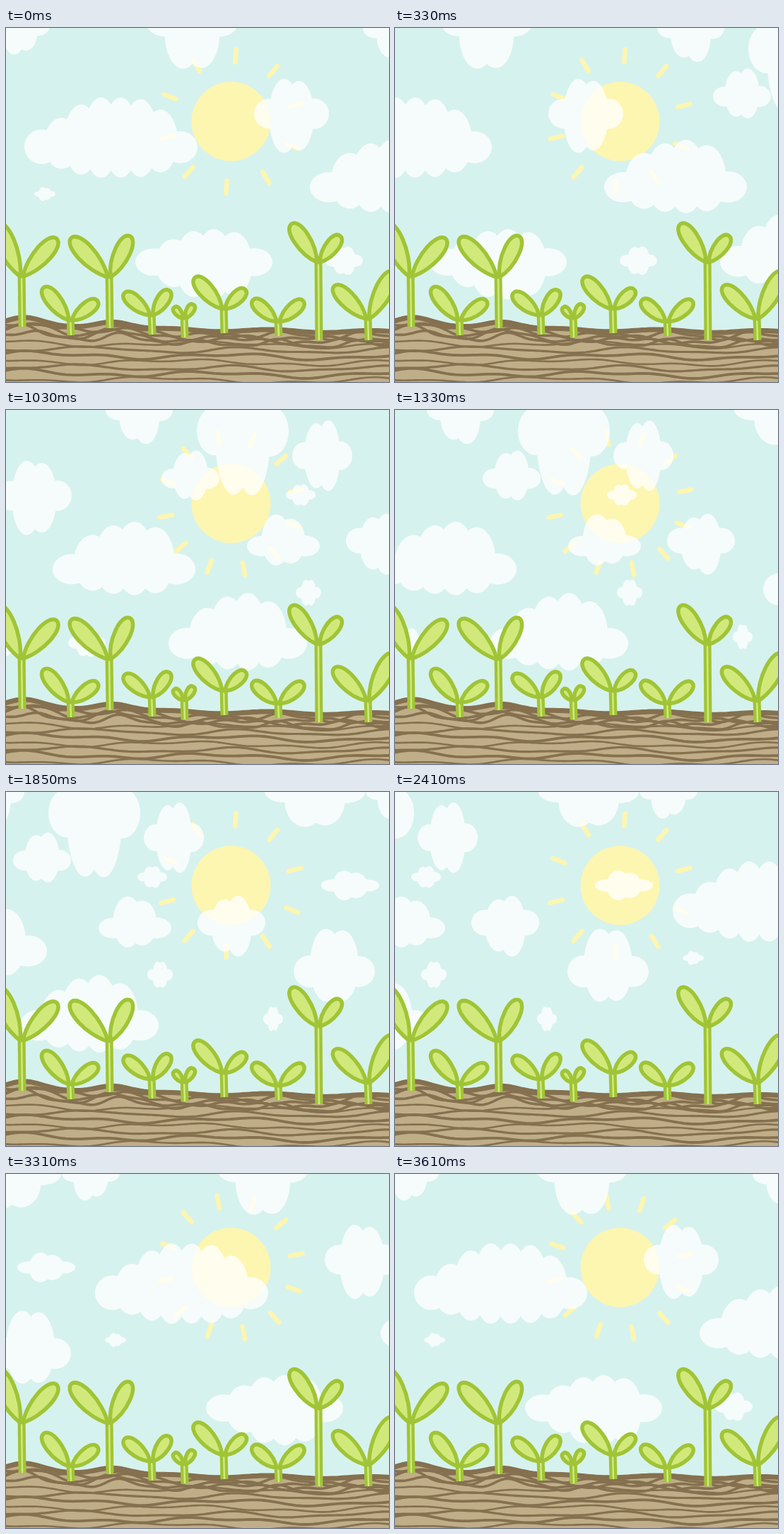
Recreate the animation shown at these times as an HTML page. Size 542 by 500 pixels, loop 3.71 s.

```html
<!DOCTYPE html>
<html lang="en">
<head>
<meta charset="utf-8">
<title>Seedlings under a drifting sky</title>
<style>
html, body { margin: 0; width: 100%; height: 100%; overflow: hidden; background: #d6f2ee; }
svg { display: block; width: 100%; height: 100%; }
</style>
</head>
<body>
<svg viewBox="0 0 542 500">
  <rect width="542" height="500" fill="#d6f2ee"/>
  <g id="sun" fill="#fdf6b1" stroke="#fdf6b1" stroke-width="6.5" stroke-linecap="round"></g>
  <g fill="#fff" opacity=".79">
    <g id="sky"><g id="clouds"></g><use href="#clouds" x="1104"/><use href="#clouds" x="-1104"/></g>
  </g>
  <g id="soil" fill="none" stroke="#85704f" stroke-linecap="round" stroke-linejoin="round"></g>
  <g id="plants" fill="#d1e97b" stroke="#a0c436" stroke-linejoin="round"></g>
</svg>
<script>
const LOOP = 3710, WORLD = 1104;
const $ = id => document.getElementById(id);

let seed = 7;
const random = () => (seed = seed * 16807 % 2147483647) / 2147483647;
const bell = (x, mid, width) => Math.exp(-(((x - mid) / width) ** 2));

// A row of puffs fills the box; tallest at peak, low = how far the small ones sink.
function cloud(x, y, w, h, peak = .5, low = .5) {
  const n = Math.max(4, Math.round(w / 32)), rx = .8 * w / n;
  let puffs = '';
  for (let i = 0; i < n; i++) {
    const u = i / (n - 1), far = (u - peak) / (u < peak ? peak : 1 - peak);
    const tall = (1 - .6 * far * far) * (1 - .1 * random());
    const cx = x + rx + (w - 2 * rx) * u, cy = y + h * (low * (1 - tall) + tall / 2);
    puffs += `<ellipse cx="${cx}" cy="${cy}" rx="${rx}" ry="${h * tall / 2}"/>`;
  }
  return puffs;
}
$('clouds').innerHTML = [
  cloud(26, 92, 245, 122, .6, .7),
  cloud(40, 224, 30, 21, .35),
  cloud(199, -40, 129, 105, .5, .2),
  cloud(351, 68, 106, 113, .5, .45),
  cloud(183, 281, 194, 106, .7, .45),
  cloud(430, 150, 202, 114, .6, .75),
  cloud(505, -30, 95, 80, .6, .3),
  cloud(452, 306, 53, 45, .6),
  cloud(584, 54, 82, 76, .5, .6),
  cloud(634, -50, 130, 182, .5, .4),
  cloud(769, 12, 85, 105, .6),
  cloud(760, 103, 42, 34),
  cloud(594, 255, 196, 114, .6, .75),
  cloud(705, 144, 103, 77, .45, .7),
  cloud(774, 237, 36, 42),
  cloud(845, 143, 96, 95, .7, .4),
  cloud(940, -25, 142, 80, .5, .2),
  cloud(938, 301, 28, 39),
  cloud(981, 186, 115, 114, .4, .65),
  cloud(1020, 110, 82, 44, .45),
  cloud(1083, -25, 82, 64, .4, .3)
].join('');

// Three redrawn suns: evenly spread rays, each set with its own count and turn.
function sun(count, turn, radius) {
  let rays = '';
  for (let i = 0; i < count; i++) {
    const a = (turn + i * 360 / count) * Math.PI / 180;
    const at = r => `${318.5 + r * Math.cos(a)},${132 + r * Math.sin(a)}`;
    rays += `M${at(radius - 9)}L${at(radius + 9)}`;
  }
  return `<g><circle cx="318.5" cy="132" r="56" stroke="none"/><path d="${rays}"/></g>`;
}
$('sun').innerHTML = sun(10, -86, 93) + sun(12, -131, 94) + sun(11, -78, 96);

// Soil: a bumpy edge with strands of brown line below it.
const ground = x => 424 + (x - 300) * .01 - 17 * bell(x, 24, 40) - 12 * bell(x, 152, 36) + 1.8 * Math.sin(x / 23 + 1);
const wave = (x, k) => Math.sin(x / (17 + k % 3 * 4) + k * 2.3) + .5 * Math.sin(x / 9 + k * 4.1);
function strand(f, width, extra = '') {
  let d = '';
  for (let x = 0; x <= 545; x += 5) d += `${x ? 'L' : 'M'}${x},${f(x).toFixed(1)}`;
  return `<path d="${d}${extra}" stroke-width="${width}"/>`;
}
let soil = `<g fill="#bfae88">${strand(ground, 0, 'V500H0Z')}</g>` + strand(x => ground(x) + 3, 7);
for (let k = 0; k < 4; k++) soil += strand(x => ground(x) + 9 + k * 4 + 3.5 * wave(x, k), 3.6);
for (let k = 0; k < 7; k++) {
  soil += strand(x => 447 + k * 8.5 + 3.4 * wave(x * .5, k + 5) + (ground(x) - 424) * .2, 2.6 + k % 3 * .6);
}
$('soil').innerHTML = soil;

// A leaf runs from base to tip, wider when longer.
function leaf(bx, by, tx, ty) {
  const dx = tx - bx, dy = ty - by, len = Math.hypot(dx, dy);
  const half = Math.min(.3 * len, 6 + .13 * len), end = 1 - 2 / len;
  const at = (u, w) => `${bx + dx * u - dy / len * w},${by + dy * u + dx / len * w}`;
  return `<path d="M${bx},${by}C${at(.35, half)} ${at(.96, half)} ${at(end, 0)}C${at(.96, -half)} ${at(.35, -half)} ${bx},${by}Z" stroke-width="5.5"/>`;
}
// Stem from joint to foot, then a leaf to each tip.
function sprout(x, joint, foot, lx, ly, rx, ry) {
  const d = `M${x},${joint - 6}L${x + 1},${foot}`;
  return `<path d="${d}" stroke-width="11"/><path d="${d}" stroke="#d1e97b" stroke-width="2.5"/>` +
    leaf(x - 2, joint, lx, ly) + leaf(x + 2, joint, rx, ry);
}
$('plants').innerHTML = [
  sprout(22, 351, 422, -14, 273, 73, 296),
  sprout(91, 413, 434, 52, 365, 131, 384),
  sprout(146, 352, 424, 91, 295, 176, 292),
  sprout(206, 406, 433, 166, 373, 232, 369),
  sprout(252, 410, 437, 237, 393, 266, 389),
  sprout(308, 397, 431, 266, 351, 340, 368),
  sprout(385, 415, 435, 348, 383, 422, 384),
  sprout(442, 331, 441, 403, 275, 474, 292),
  sprout(512, 411, 441, 463, 363, 549, 342)
].join('');

// Drawings change every 100 ms, slower (140 ms) in the middle.
const startOf = n => n < 1 ? 0 : 30 + (n - 1) * 100 + 40 * Math.min(12, Math.max(0, n - 15));
function stepAt(t) {
  let n = 32;
  while (startOf(n) > t) n--;
  return n;
}

const drift = [[0, 0], [8, 268], [14, 460], [18, 574], [22, 737], [26, 905], [32, 1103]];
function driftAt(n) {
  const i = Math.max(1, drift.findIndex(p => p[0] >= n));
  const [n0, x0] = drift[i - 1], [n1, x1] = drift[i];
  return x0 + (x1 - x0) * (n - n0) / (n1 - n0);
}

const suns = [...$('sun').children];
function draw(t) {
  const n = stepAt(t), start = startOf(n);
  const pose = Math.floor((start < 3110 ? start : start + 120) / 100) % 3;
  suns.forEach((g, i) => g.setAttribute('display', i === pose ? 'inline' : 'none'));
  $('sky').setAttribute('transform', `translate(${-driftAt(n)} 0)`);
}

const begin = performance.now();
function tick() {
  draw((performance.now() - begin) % LOOP);
  requestAnimationFrame(tick);
}
tick();
</script>
</body>
</html>
```
